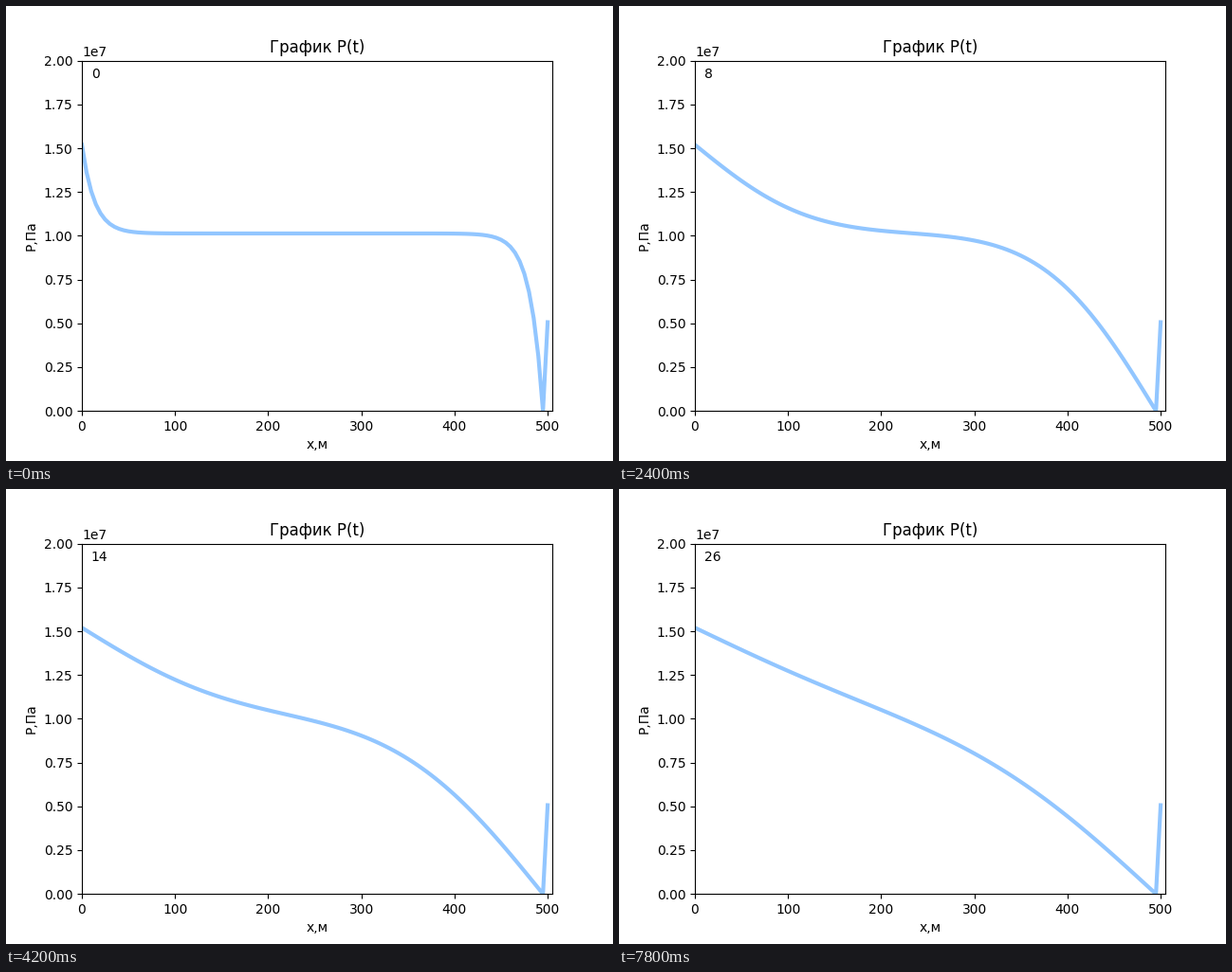
These frames come from a looping animation (640 by 480 pixels, 8000 ms). A matplotlib script:

```python
import numpy as np
import matplotlib.pyplot as plt
from matplotlib.animation import FuncAnimation

ATM = 101325
LENGTH, DX = 500, 5
R = 7.2                # diffusivity * dt / dx^2
STEPS_PER_COUNT = 3
COUNTS = 27
TICK_MS, TICKS, TICKS_PER_COUNT = 100, 80, 3

x = np.arange(0, LENGTH + DX, DX)


def solve_pressure():
    """Implicit diffusion between fixed ends; one profile per count."""
    n = len(x) - 1     # the last node keeps its own boundary value
    matrix = ((1 + 2 * R) * np.eye(n)
              - R * (np.eye(n, k=1) + np.eye(n, k=-1)))
    matrix[[0, -1]] = 0
    matrix[0, 0] = matrix[-1, -1] = 1
    inverse = np.linalg.inv(matrix)

    p = np.full(n, 100.0 * ATM)
    p[0], p[-1] = 150 * ATM, 0
    profiles = []
    for step in range(STEPS_PER_COUNT * (COUNTS - 1) + 1):
        p = inverse @ p
        if step % STEPS_PER_COUNT == 0:
            profiles.append(np.append(p, 50 * ATM))
    return profiles


profiles = solve_pressure()

fig, ax = plt.subplots(figsize=(6.4, 4.8), dpi=100)
ax.set(xlim=(0, 505), ylim=(0, 2e7), title="График P(t)",
       xlabel="х,м", ylabel="Р,Па")
line, = ax.plot(x, profiles[0], color="#92C6FF", linewidth=3)
counter = ax.text(10, 1.9e7, "0")


def update(tick):
    count = tick // TICKS_PER_COUNT
    line.set_ydata(profiles[count])
    counter.set_text(str(count))
    return line, counter


anim = FuncAnimation(fig, update, frames=TICKS, interval=TICK_MS,
                     repeat=True, repeat_delay=0)
plt.show()
```
